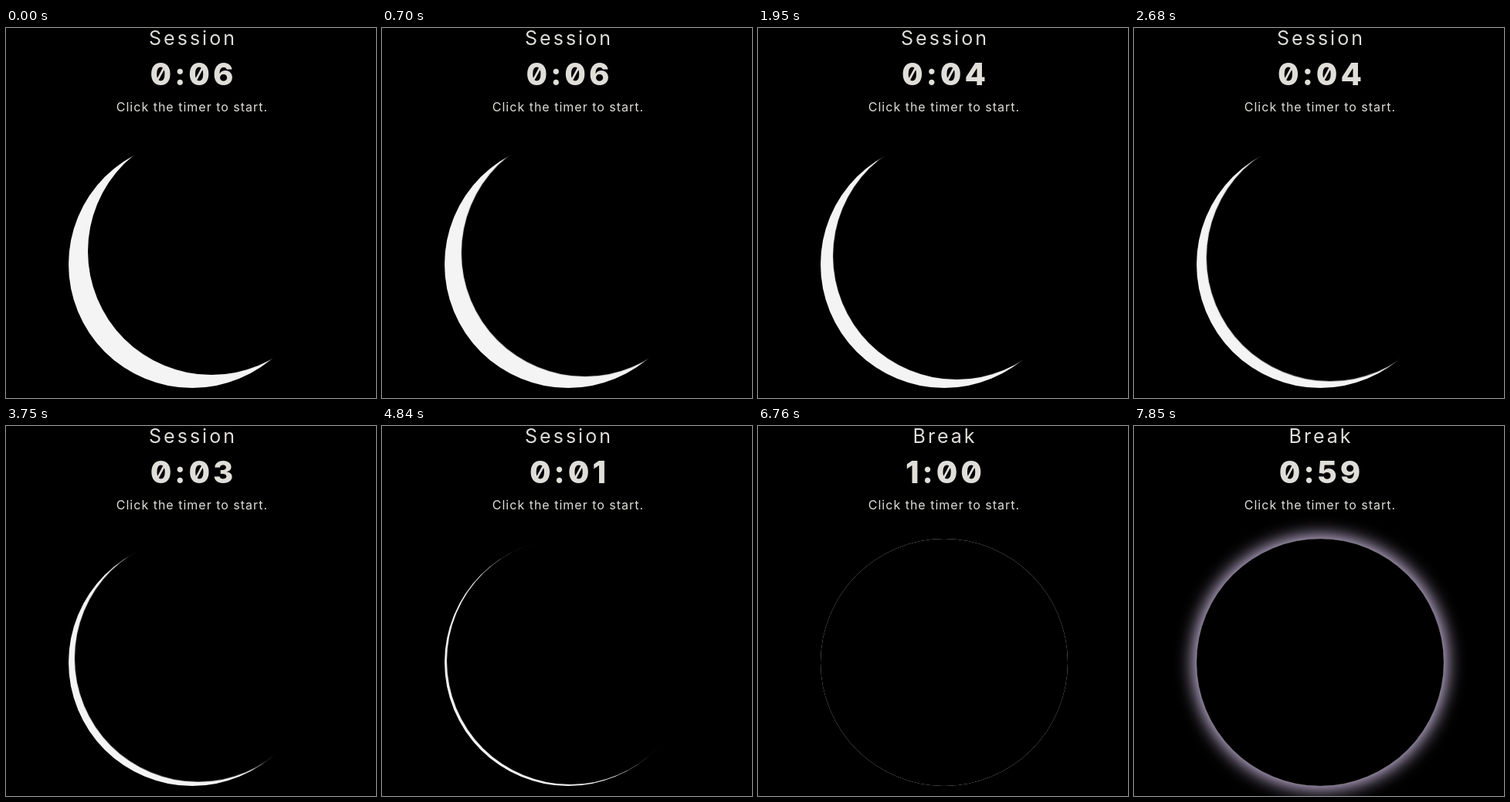
An HTML page for the animation above (8000 ms loop, 479x479 px).

```html
<!DOCTYPE html>
<html lang="en">
<head>
<meta charset="utf-8">
<title>Eclipse timer</title>
<style>
  :root { --loop: 8000ms; }

  html, body {
    margin: 0;
    width: 100%;
    height: 100%;
    overflow: hidden;
    background: #000;
  }

  body {
    position: relative;
    color: #dfded9;
    font-family: Inter, "Open Sans", sans-serif;
    text-align: center;
  }

  /* Each label is a one-line window; its column of lines steps upwards. */
  .label {
    position: absolute;
    left: 0;
    width: 481px;
    height: var(--line);
    line-height: var(--line);
    letter-spacing: var(--gap);
    text-indent: var(--gap);
    white-space: nowrap;
    overflow: hidden;
  }
  .label span { display: block; height: var(--line); }
  .column { animation: var(--loop) step-end infinite; }

  .mode  { --line: 30px; --gap: 3px; top: -2px; font-size: 25px; }
  .clock {
    --line: 48px;
    --gap: 4px;
    top: 35.5px;
    font-size: 40px;
    font-weight: 800;
    font-variant-numeric: slashed-zero;
  }
  .hint  { --line: 20px; --gap: 1px; top: 92px; font-size: 16px; }

  .mode .column  { animation-name: mode; }
  .clock .column { animation-name: tick; }

  @keyframes mode {
    0%    { transform: none; }
    84.5%, 100% { transform: translateY(-30px); }
  }

  @keyframes tick {
    0%      { transform: none; }
    11%     { transform: translateY(-48px); }
    22.5%   { transform: translateY(-96px); }
    34.75%  { transform: translateY(-144px); }
    47.875% { transform: translateY(-192px); }
    59.25%  { transform: translateY(-240px); }
    71.75%  { transform: translateY(-288px); }
    84.5%   { transform: translateY(-336px); }
    97%, 100% { transform: translateY(-384px); }
  }

  .disc {
    position: absolute;
    left: 81px;
    top: 146px;
    width: 320px;
    height: 320px;
    border-radius: 50%;
  }
  .moon { background: #f4f4f4; }
  .glow {
    box-shadow: 0 0 23px 3px rgb(232, 212, 255);
    animation: glow var(--loop) linear infinite;
  }
  .shade {
    background: #000;
    animation: cover var(--loop) linear infinite;
  }

  @keyframes cover {
    0% { transform: translate(25px, -17px); }
    68.4%, 100% { transform: none; }
  }

  @keyframes glow {
    0%, 84.5% { opacity: 0; }
    98.1%, 100% { opacity: 1; }
  }
</style>
</head>
<body>
  <div class="disc glow"></div>
  <div class="disc moon"></div>
  <div class="disc shade"></div>

  <div class="label mode">
    <div class="column"><span>Session</span><span>Break</span></div>
  </div>
  <div class="label clock">
    <div class="column">
      <span>0:06</span><span>0:05</span><span>0:04</span>
      <span>0:03</span><span>0:02</span><span>0:01</span>
      <span>0:00</span><span>1:00</span><span>0:59</span>
    </div>
  </div>
  <div class="label hint">Click the timer to start.</div>
</body>
</html>
```
